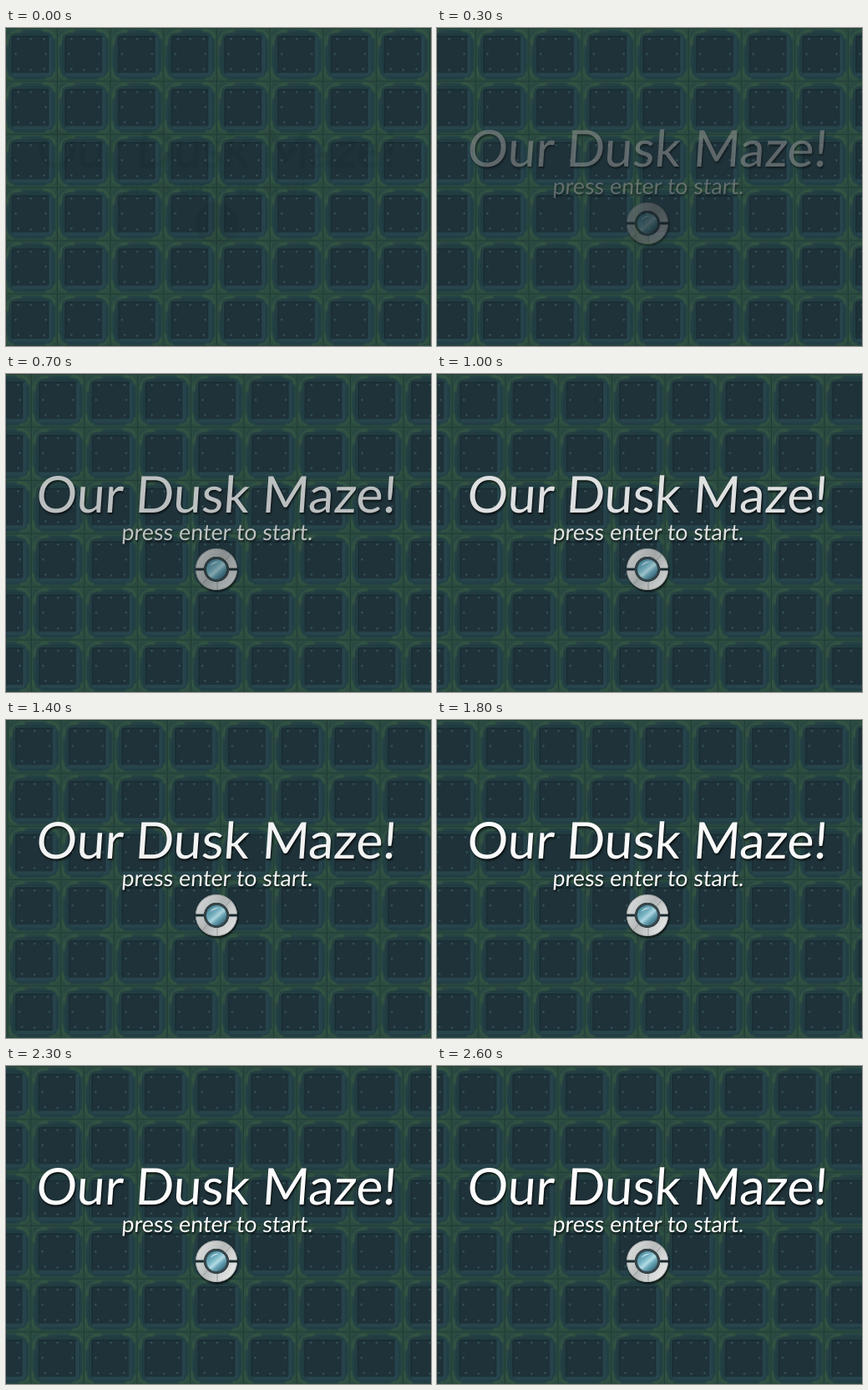
Animation of 509x381 px, one loop 2700 ms. Source, as an HTML page:

```html
<!DOCTYPE html>
<html lang="en">
<head>
<meta charset="utf-8">
<title>Title screen</title>
<style>
  html, body { margin: 0; width: 100%; height: 100%; overflow: hidden; background: #22383c; }
  svg { display: block; }
  text { font-family: Lato, "Open Sans", sans-serif; fill: #fff; text-anchor: middle; }
  .raised { filter: drop-shadow(1.5px 2px 1px rgba(0, 0, 0, .8)); }
</style>
</head>
<body>
<svg width="509" height="381" viewBox="0 0 509 381">
  <defs>
    <filter id="soft" x="-20%" y="-20%" width="140%" height="140%"><feGaussianBlur stdDeviation="1"/></filter>
    <linearGradient id="rim" x2="1" y2="1">
      <stop offset="0" stop-color="#264344"/><stop offset="1" stop-color="#213b44"/>
    </linearGradient>
    <linearGradient id="steel" x1="-25" y1="-14" x2="25" y2="18" gradientUnits="userSpaceOnUse">
      <stop offset="0" stop-color="#dfe1e1"/><stop offset=".45" stop-color="#b9bcbc"/>
      <stop offset=".7" stop-color="#d6d8d8"/><stop offset="1" stop-color="#f0f1f1"/>
    </linearGradient>
    <linearGradient id="glass" x1=".15" y1=".1" x2=".85" y2=".9">
      <stop offset="0" stop-color="#4b8da1"/><stop offset=".35" stop-color="#79b6c6"/>
      <stop offset=".55" stop-color="#b4dde6"/><stop offset=".7" stop-color="#6fabbc"/>
      <stop offset="1" stop-color="#35697b"/>
    </linearGradient>
    <g id="rivet">
      <circle r="2" fill="#182a31"/>
      <circle cx=".3" cy=".3" r="1.4" fill="#35535a"/>
    </g>
    <pattern id="tile" width="63.7" height="63.7" patternUnits="userSpaceOnUse">
      <rect width="64" height="64" fill="#2c4a40"/>
      <rect x="2.5" y="2.5" width="59" height="59" rx="9" fill="url(#rim)" filter="url(#soft)"/>
      <g fill="none" stroke="#395c42" stroke-linecap="round" filter="url(#soft)">
        <path d="M4 20Q4 4 20 4M48 3Q60 3 61 12" stroke-width="2.5"/>
        <path d="M2 48Q3 61 11 61M51 61Q61 61 61 53" stroke-width="2"/>
        <path d="M2 1.5H62M1.5 2V62" opacity=".6"/>
      </g>
      <path d="M0 .5H64M.5 0V64" stroke="#203a35"/>
      <path d="M7 52V13Q7 7 13 7H52" fill="none" stroke="#1e363b"/>
      <path d="M57 11V52Q57 57 52 57H11" fill="none" stroke="#2b4a52"/>
      <rect x="10" y="10" width="44" height="44" rx="1.5" fill="#1f3239" stroke="#15272f" stroke-width="1.2"/>
      <path d="M54.7 11V54.7H11" fill="none" stroke="#34545e" stroke-width=".8"/>
      <use href="#rivet" x="17" y="13"/><use href="#rivet" x="32" y="13"/><use href="#rivet" x="48" y="13"/>
      <use href="#rivet" x="14" y="31"/><use href="#rivet" x="50" y="31"/>
      <use href="#rivet" x="17" y="49"/><use href="#rivet" x="32" y="50"/><use href="#rivet" x="48" y="49"/>
    </pattern>
  </defs>

  <rect width="509" height="381" fill="url(#tile)"/>

  <g id="title">
    <g class="raised">
      <text transform="translate(251 166) skewX(-4)" font-size="60.7">Our Dusk Maze!</text>
      <text transform="translate(252.5 198.5) skewX(-4)" font-size="26.8">press enter to start.</text>
      <g transform="translate(252 234)">
        <circle r="20" fill="none" stroke="url(#steel)" stroke-width="10"/>
        <circle r="24.5" fill="none" stroke="#8f9494" opacity=".6"/>
        <path d="M1 15V25M11-11L17-18M-11 11L-17 18" stroke="#8b9090" stroke-width=".8"/>
        <path d="M-25 0H-14M14 0H25" stroke="#1d2d32" stroke-width="3"/>
        <circle r="15" fill="#37474c"/>
        <circle r="12" fill="url(#glass)"/>
        <path d="M-8-4Q-4-10 3-9Q-3-7-8-4Z" fill="#e2f1f4" opacity=".7"/>
      </g>
    </g>
  </g>
</svg>
<script>
  const LOOP = 2700, STEP = 100;
  const tile = document.getElementById('tile');
  const title = document.getElementById('title');

  function draw(now) {
    const step = Math.floor(now % LOOP / STEP);
    const scroll = 5 * Math.min(step, 3) + 4.02 * Math.max(step - 3, 0);
    tile.setAttribute('patternTransform', `translate(${61 - scroll} -0.2)`);

    // The title brightens from black while it fades in.
    const fade = 1 - 0.95 * 0.77 ** step;
    title.style.opacity = fade;
    title.style.filter = `brightness(${fade})`;
    requestAnimationFrame(draw);
  }
  requestAnimationFrame(draw);
</script>
</body>
</html>
```
